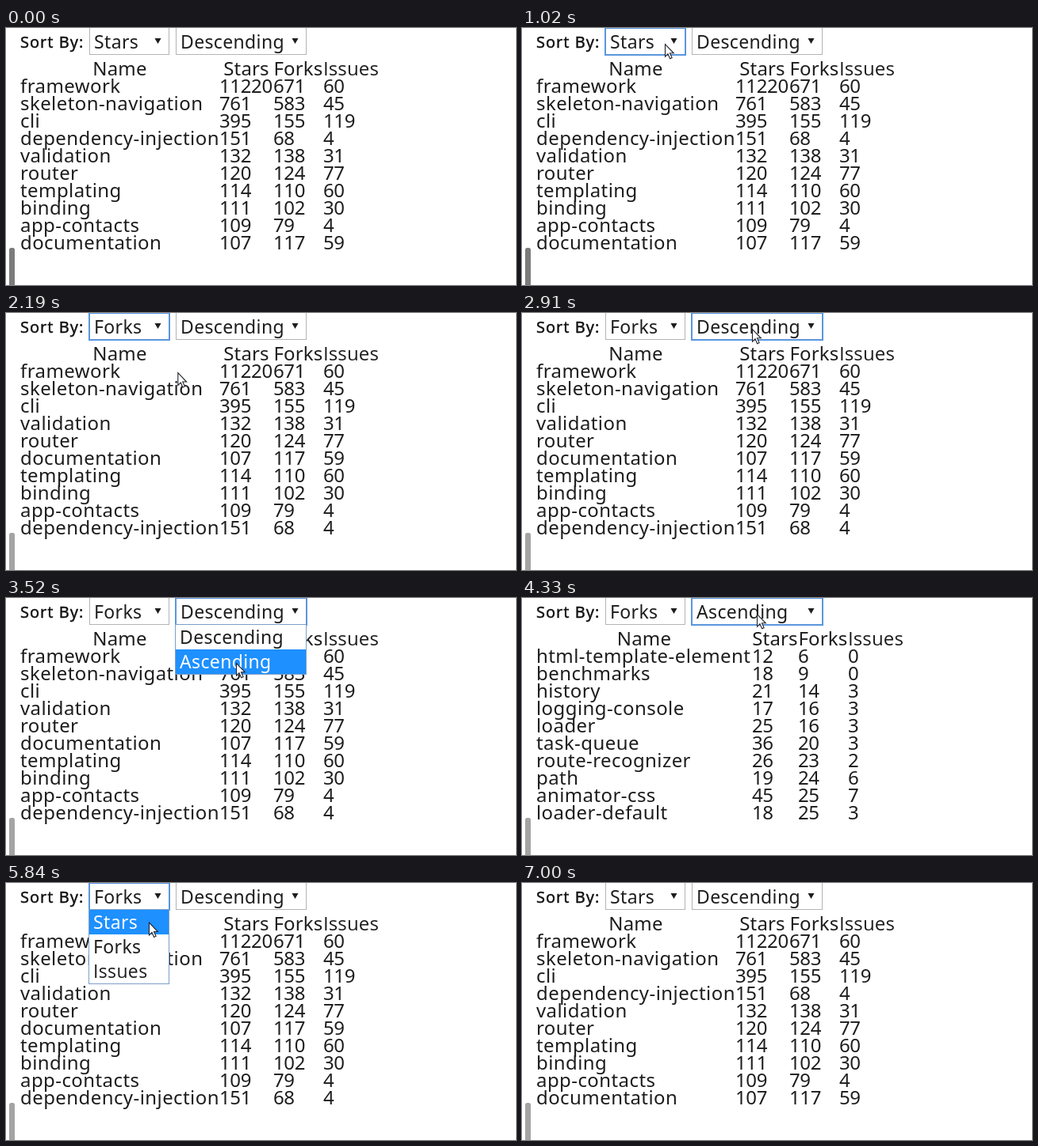
These frames come from a looping animation (643x325 px, 7120 ms). An HTML page:

```html
<!DOCTYPE html>
<html lang="en">
<head>
<meta charset="utf-8">
<title>Sortable repository table</title>
<style>
  html, body { margin: 0; width: 100%; height: 100%; overflow: hidden; background: #fff; }
  svg { display: block; font: 24px "Noto Sans", sans-serif; fill: #1d1d1d; }
  .word { letter-spacing: .42px; }
  .num { letter-spacing: -.36px; }
  .head { text-anchor: middle; letter-spacing: .15px; }
  .plain { font-family: "Open Sans", sans-serif; }
  .label { font-size: 20px; letter-spacing: 1px; fill: #111; stroke: #111; stroke-width: .4px; }
  .option { font-size: 23px; letter-spacing: .35px; }
</style>
</head>
<body>
<svg id="stage" width="643" height="325" viewBox="0 0 643 325"></svg>
<script>
const LOOP = 7120, ENTER = 500, BLUR = 6860, LEAVE = 7000;
const LAG = 70; // delay between a click and the redrawn table
const stage = document.getElementById('stage');

const parse = list => list.trim().split('\n').map(line => line.trim().split(' '));
const popular = parse(`
  framework 11220 671 60
  skeleton-navigation 761 583 45
  cli 395 155 119
  dependency-injection 151 68 4
  validation 132 138 31
  router 120 124 77
  templating 114 110 60
  binding 111 102 30
  app-contacts 109 79 4
  documentation 107 117 59`);
const leastForked = parse(`
  html-template-element 12 6 0
  benchmarks 18 9 0
  history 21 14 3
  logging-console 17 16 3
  loader 25 16 3
  task-queue 36 20 3
  route-recognizer 26 23 2
  path 19 24 6
  animator-css 45 25 7
  loader-default 18 25 3`);

const selects = [
  { left: 105, right: 206, options: ['Stars', 'Forks', 'Issues'] },
  { left: 214, right: 379, options: ['Descending', 'Ascending'] }
];

// Each pick: pointer goes to a select, opens it, moves down to an option and clicks
const picks = [
  { select: 0, option: 1, x: 180, go: ENTER, reach: 1000, open: 1090, hover: 1370, click: 1790 },
  { select: 1, option: 1, x: 290, go: 1950, reach: 2680, open: 2980, hover: 3160, click: 3840 },
  { select: 1, option: 0, x: 296, go: 3840, reach: 4330, open: 4440, hover: 4710, click: 5080 },
  { select: 0, option: 0, x: 180, go: 5080, reach: 5420, open: 5560, hover: 5700, click: 6020 }
];
const moves = picks.flatMap(({ option, x, go, reach, hover, click }) => [
  { from: go, to: reach, x, y: 20 },
  { from: hover, to: hover + .45 * (click - hover), x, y: 51 + 31 * option }
]);
moves.push({ from: picks[3].click, to: BLUR, x: 567, y: 8 });

function pointer(t) {
  if (t < ENTER || t >= LEAVE) return null;
  return moves.reduce((tip, { from, to, x, y }) => {
    const p = Math.min(1, Math.max(0, (t - from) / (to - from)));
    return { x: tip.x + (x - tip.x) * p, y: tip.y + (y - tip.y) * p * p };
  }, { x: 519, y: 6 });
}

function chosenAt(t) {
  const chosen = [0, 0];
  for (const { select, option, click } of picks) if (t >= click) chosen[select] = option;
  return chosen;
}

const text = (x, y, string, kind, fill = '') =>
  `<text x="${x}" y="${y}" class="${kind}${string === 'Issues' ? ' plain' : ''}"${fill && ` fill="${fill}"`}>${string}</text>`;
const rect = (x, y, w, h, fill, stroke = 'none', weight = 1, radius = 0) =>
  `<rect x="${x}" y="${y}" width="${w}" height="${h}" rx="${radius}" fill="${fill}" stroke="${stroke}" stroke-width="${weight}"/>`;

function drawTable([key, ascending]) {
  const rows = ascending ? leastForked : [...popular].sort((a, b) => b[key + 1] - a[key + 1]);
  const edges = ascending ? [18, 290, 348, 411, 481] : [18, 269, 337, 400, 470];
  const heads = ['Name', 'Stars', 'Forks', 'Issues'].map((title, i) =>
    text((edges[i] + edges[i + 1]) / 2, 60, title, 'head'));
  const cells = rows.map((row, r) => row.map((value, i) =>
    text(edges[i], 82 + 22 * r, value, i ? 'num' : 'word')).join(''));
  return heads.join('') + cells.join('');
}

function drawSelect({ left, right, options }, chosen, focused) {
  const box = focused
    ? rect(left, 0, right - left, 34, '#fff', '#5a96de', 2)
    : rect(left + .5, -.5, right - left - 1, 34, '#fff', '#b4b4b4');
  const arrow = `<path d="M${right - 18.5} 13h8l-4 7z"/>`;
  return box + text(left + 6, 26, options[chosen], 'option') + arrow;
}

function drawMenu({ left, right, options }, chosen, tip) {
  const hovered = tip.y >= 34 ? Math.floor((tip.y - 34) / 31) : chosen;
  const frame = rect(left - .5, 33.5, right - left, 31 * options.length + 1, '#fff', '#7c9fc8');
  return frame + options.map((option, i) => {
    const y = 34 + 31 * i, active = i === hovered;
    return (active ? rect(left, y, right - left - 1, 31, '#1e90ff') : '') +
      text(left + 5, y + 24, option, 'option', active ? '#fff' : '');
  }).join('');
}

const drawPointer = ({ x, y }) =>
  `<path transform="translate(${x} ${y})" d="M.5 .5V16.2L4 12.8 6.6 18.7 9.1 17.6 6.5 11.8H11.3Z" fill="#fff" stroke="#22242e" stroke-width="1.1"/>`;

function render() {
  const t = performance.now() % LOOP, tip = pointer(t), chosen = chosenAt(t);
  const pick = picks.findLast(({ open }) => t >= open - LAG);
  const focus = pick && t < BLUR ? pick.select : -1;
  const isOpen = pick && t >= pick.open && t < pick.click;
  stage.innerHTML =
    rect(4, 278, 7, 60, t < picks[0].click + LAG ? '#7b7b7b' : '#a4a4a4', 'none', 0, 2.5) +
    text(18, 25, 'Sort By:', 'label') +
    drawTable(chosenAt(t - LAG)) +
    selects.map((select, i) => drawSelect(select, chosen[i], i === focus)).join('') +
    (isOpen ? drawMenu(selects[focus], chosen[focus], tip) : '') +
    (tip ? drawPointer(tip) : '');
  requestAnimationFrame(render);
}
render();
</script>
</body>
</html>
```
